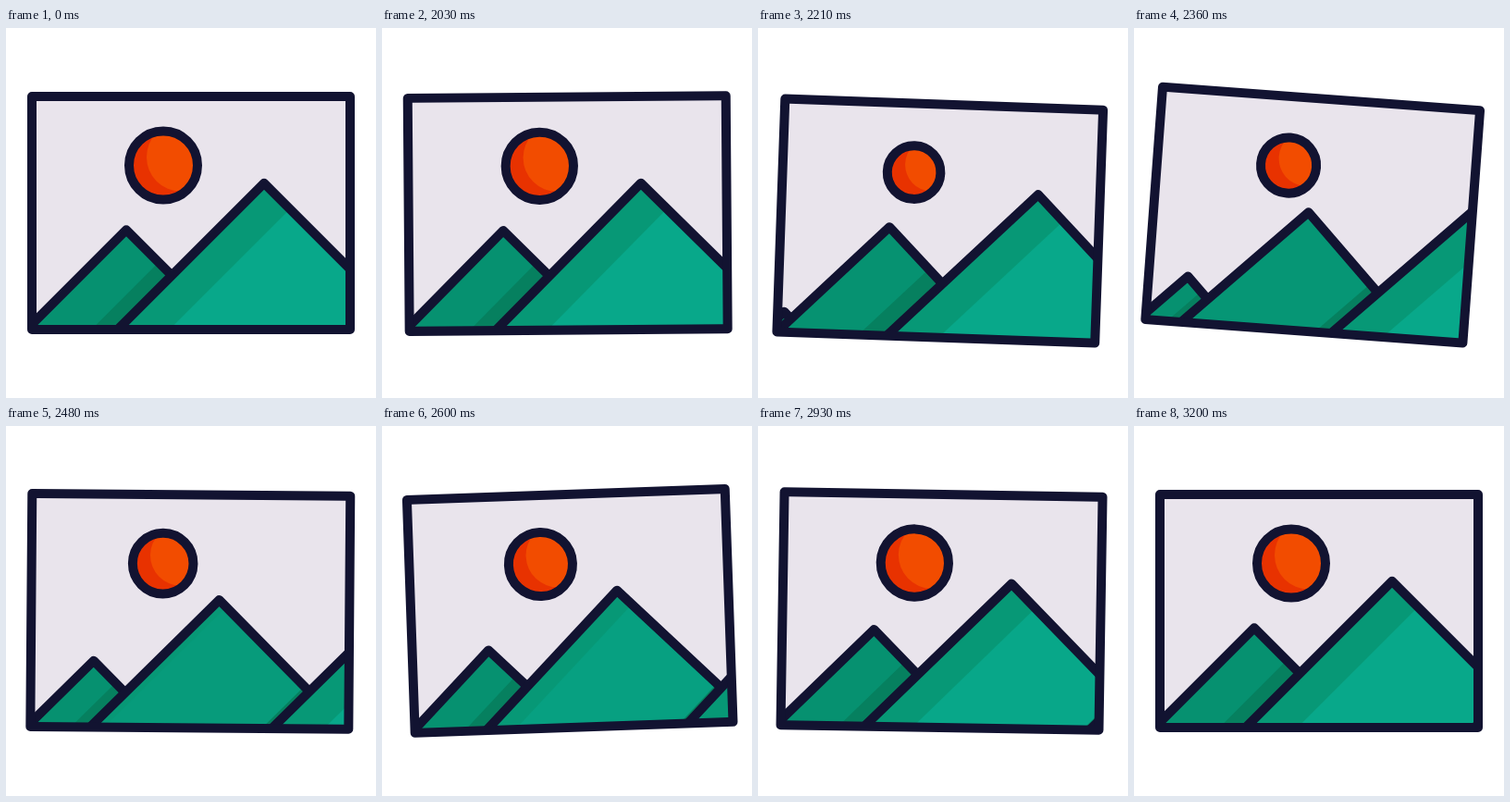
Write an HTML page without scripts that moves like this. It is 400 px wide and 400 px high and loops after 3.23 s.

```html
<!DOCTYPE html>
<html lang="en">
<head>
<meta charset="utf-8">
<title>Picture icon</title>
<style>
  html, body { margin: 0; width: 100%; height: 100%; overflow: hidden; background: #fff; }
  svg { display: block; width: 100%; height: 100%; }

  .picture, .lag, .slide, .uncover, .sun { animation: 3230ms infinite; }

  .line { fill: none; stroke: #121331; stroke-width: 10; stroke-linecap: round; stroke-linejoin: round; }
  .base { fill: #079876; }
  .shade { fill: #06805f; }

  /* The whole picture dips and swings from a point near its top. */
  .picture {
    transform-origin: 200px 108px;
    animation-name: swing, dip;
    animation-timing-function: cubic-bezier(.37, 0, .63, 1);
  }
  @keyframes swing {
    0%, 61.92% { rotate: 0deg; }
    65.02% { rotate: -2.05deg; }
    71.21% { rotate: 4.9deg; }
    80.65% { rotate: -2deg; }
    88.85% { rotate: 1deg; }
    99.07%, 100% { rotate: 0deg; }
  }
  @keyframes dip {
    0%, 61.92% { translate: 0 0; }
    67.8% { translate: 0 9px; animation-timing-function: ease; }
    79.9%, 100% { translate: 0 0; }
  }

  /* The rising mountains lag behind the dip. */
  .lag { animation-name: lag; animation-timing-function: cubic-bezier(.37, 0, .63, 1); }
  @keyframes lag {
    0%, 61.92% { translate: 0 0; }
    67.8% { translate: 0 -4.6px; }
    76% { translate: 0 3.6px; animation-timing-function: ease; }
    99.07%, 100% { translate: 0 0; }
  }

  /* Each mountain moves on to the place and colours of the next one. */
  .slide { animation-name: slide; animation-timing-function: cubic-bezier(.405, 0, .12, 1); }
  @keyframes slide {
    0%, 61.92% { translate: var(--from); }
    99.07%, 100% { translate: var(--to); }
  }
  .uncover {
    animation-name: uncover, tint;
    animation-timing-function: cubic-bezier(.15, .45, .4, 1), cubic-bezier(.5, 0, .3, 1);
  }
  @keyframes uncover {
    0%, 74.3% { translate: 0 0; }
    99.07%, 100% { translate: 28px 28px; }
  }
  @keyframes tint {
    0%, 61.92% { fill: #069170; }
    99.07%, 100% { fill: #08a88a; }
  }

  .sun { r: 37px; animation-name: shrink; }
  @keyframes shrink {
    0%, 61.92% { r: 37px; animation-timing-function: cubic-bezier(.37, 0, .63, 1); }
    69.35% { r: 28.5px; animation-timing-function: cubic-bezier(.19, 0, .14, 1); }
    99.07%, 100% { r: 37px; }
  }

  .back { --from: 24px 319px; --to: 130px 218.3px; }
  .back .shade { --from: 0px 0px; --to: 35px 35px; }
  .middle { --from: 130px 218.3px; --to: 279px 167.7px; }
  .middle .shade { --from: 35px 35px; --to: 120px 120px; }
  .front { --from: 279px 167.7px; --to: 527px 167.7px; }
</style>
</head>
<body>
<svg viewBox="0 0 400 400">
  <defs>
    <path id="peak" d="M-400 400 0 0 400 400"/>
    <clipPath id="inside"><rect x="28" y="74" width="344" height="252"/></clipPath>
    <clipPath id="disc"><circle class="sun" cx="170" cy="148.5"/></clipPath>
  </defs>

  <g class="picture">
    <g clip-path="url(#inside)">
      <rect x="28" y="74" width="344" height="252" fill="#e9e4ec"/>

      <circle class="sun" cx="170" cy="148.5" fill="#e83200"/>
      <g clip-path="url(#disc)">
        <circle class="sun" cx="189" cy="139.5" fill="#f24c00"/>
      </g>
      <circle class="sun line" cx="170" cy="148.5"/>

      <g class="lag">
        <g class="slide back">
          <use href="#peak" fill="#069170"/>
          <use href="#peak" class="slide shade"/>
          <use href="#peak" class="line"/>
        </g>
        <g class="slide middle">
          <use href="#peak" class="base"/>
          <use href="#peak" class="uncover"/>
          <use href="#peak" class="slide shade"/>
          <use href="#peak" class="line"/>
        </g>
      </g>
      <g class="slide front">
        <use href="#peak" class="base"/>
        <use href="#peak" x="28" y="28" fill="#08a88a"/>
        <use href="#peak" class="line"/>
      </g>
    </g>
    <rect class="line" x="28" y="74" width="344" height="252"/>
  </g>
</svg>
</body>
</html>
```
